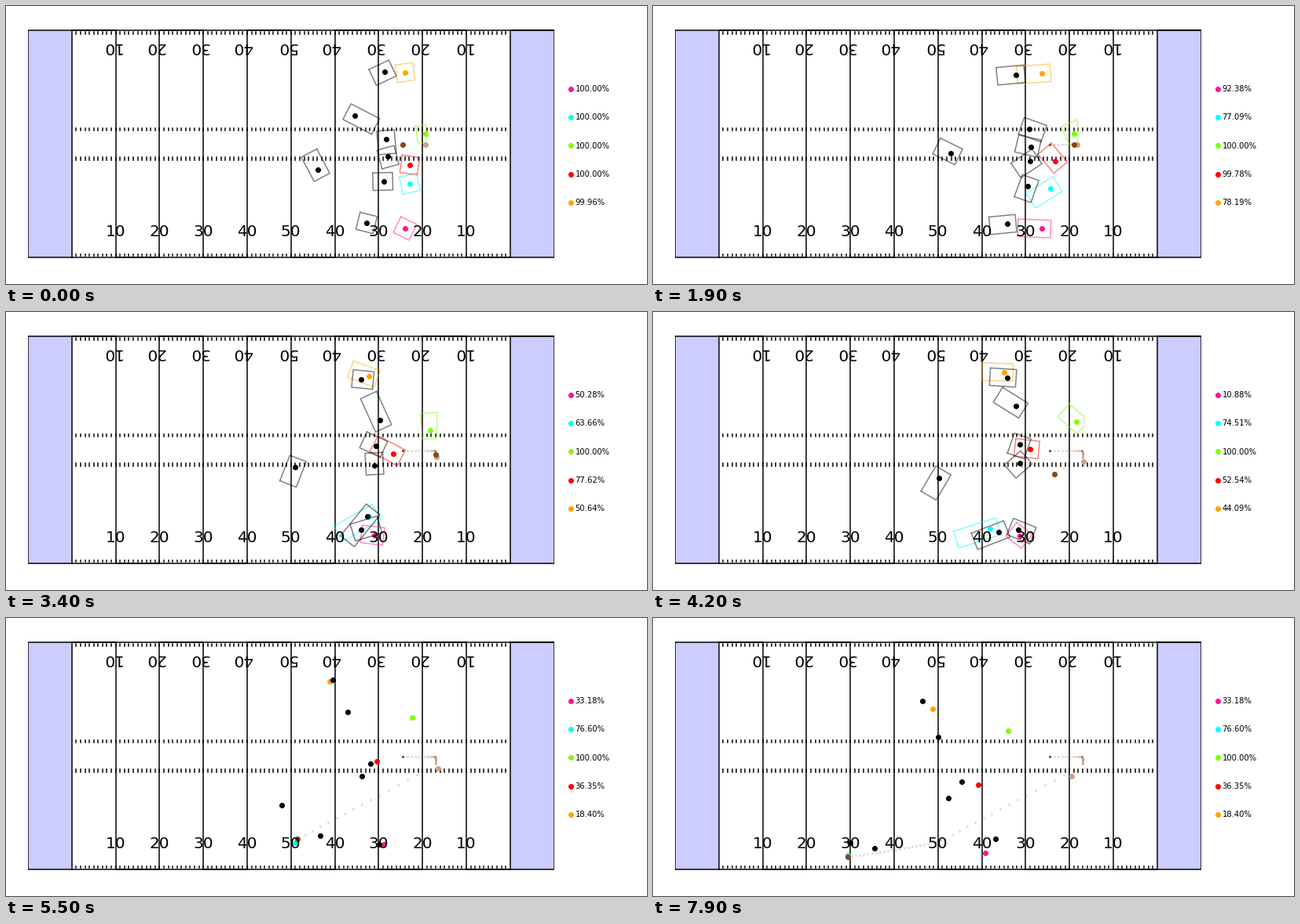
A matplotlib script for the animation above (8000 ms loop, 816 by 355 pixels).

```python
import numpy as np
import matplotlib.pyplot as plt
from matplotlib.animation import FuncAnimation
from matplotlib.patches import Rectangle

W, H, DPI = 816, 355, 72
FRAMES, STEP = 80, 100
HALF = 11.2                      # two yards in pixels
SNAP, CATCH, THROW, ARRIVAL = 12, 27, 39, 55
KEYS = np.array([0, 11, 27, 42, 55, 79])

plt.rcParams["font.family"] = "DejaVu Sans"
fig = plt.figure(figsize=(W / DPI, H / DPI), dpi=DPI, facecolor="white")
ax = fig.add_axes([0, 0, 1, 1])
ax.set_xlim(0, W)
ax.set_ylim(H, 0)
ax.axis("off")

# Positions are complex numbers: x + y*1j, in pixels.
# Each row: colour, facing at rest in degrees, waypoints at KEYS.
# Five waypoints mean the player stands still until the snap.
PLAYERS = [
    ("deeppink", 206, 508+284j, 477+285j, 467+286j, 481+289j, 423+300j),
    ("cyan", 167, 514+227j, 486+246j, 429+277j, 368+287j, 248+303j),
    ("chartreuse", 172, 534+163j, 538+159j, 539+140j, 517+127j, 452+144j),
    ("red", 188, 514+203j, 505+189j, 480+175j, 472+183j, 414+213j),
    ("orange", 172, 508+85j, 474+86j, 447+77j, 412+81j, 356+116j),
    ("black", 148, 482+84j, 474+87j, 451+87j, 451+84j, 416+79j, 343+106j),
    ("black", 31, 444+140j, 468+152j, 483+154j, 462+120j, 435+120j, 363+152j),
    ("black", 88, 484+170j, 485+181j, 475+175j, 467+169j, 464+186j, 393+209j),
    ("black", 82, 486+192j, 487+195j, 471+200j, 467+193j, 453+202j, 376+230j),
    ("black", 172, 481+224j, 477+224j, 473+241j, 440+281j, 400+278j, 282+294j),
    ("black", 194, 459+277j, 444+280j, 465+278j, 475+289j, 436+282j),
    ("black", 245, 397+209j, 388+193j, 371+189j, 364+212j, 351+239j, 251+287j),
]
PASSER = (534+177j, 534+176j, 547+180j, 548+191j, 550+192j, 533+202j)

ODDS_KEYS = KEYS[:5]
ODDS = [
    (100, 100, 84.76, 10.88, 33.18),
    (100, 100, 54.17, 74.51, 76.60),
    (100, 100, 100, 100, 100),
    (100, 100, 99.57, 52.54, 36.35),
    (99.96, 100, 56.37, 44.09, 18.40),
]


# ---- motion ----------------------------------------------------------
def run(points):
    """Smooth run through the waypoints, one position per frame."""
    if len(points) < len(KEYS):
        points = points[:1] + points
    p, h = np.array(points), np.diff(KEYS)
    d = np.diff(p) / h
    m = np.r_[d[0], (d[:-1] * h[1:] + d[1:] * h[:-1]) / (h[:-1] + h[1:]), d[-1]]
    m[1:-1][d[:-1] * d[1:] == 0] = 0
    k = np.arange(FRAMES)
    i = np.clip(np.searchsorted(KEYS, k, side="right") - 1, 0, len(h) - 1)
    s = (k - KEYS[i]) / h[i]
    return ((1 + 2 * s) * (1 - s) ** 2 * p[i] + s * (1 - s) ** 2 * h[i] * m[i]
            + s * s * (3 - 2 * s) * p[i + 1] + s * s * (s - 1) * h[i] * m[i + 1])


def ball_path(passer, catcher):
    """Snap, hold, throw, then carry."""
    k = np.arange(FRAMES)
    hands = passer - 1 - 3j
    start, release, landing = 505 + 177j, 548 + 187j, 371 + 282j
    u = np.clip((k - SNAP) / (CATCH - SNAP), 0, 1)
    snap = start + (hands[CATCH] - start) * (1 - (1 - u) ** 2.2)
    u = (k - THROW) / (ARRIVAL - THROW)
    throw = release + (landing - release) * u * (1 + 0.15 * (1 - u))
    reach = landing - catcher[ARRIVAL] - 2j
    carry = catcher + 2j + reach * np.exp(-np.maximum(k - ARRIVAL, 0) / 8)
    return np.select([k <= CATCH, k <= THROW, k <= ARRIVAL],
                     [snap, hands, throw], carry)


def box(pos, velocity, facing, limit):
    """Outline around a player, stretched ahead by speed, cut at x = limit."""
    ahead = velocity + 0.4 * np.exp(1j * np.radians(facing))
    ahead /= abs(ahead)
    front = pos + (HALF + 7.5 * abs(velocity)) * ahead
    back, side = pos - HALF * ahead, HALF * 1j * ahead
    corners = [front + side, front - side, back - side, back + side]
    out = []
    for p, q in zip(corners, corners[1:] + corners[:1]):
        if p.real <= limit:
            out.append(p)
        if (p.real <= limit) != (q.real <= limit):
            out.append(p + (limit - p.real) / (q.real - p.real) * (q - p))
    return np.array(out + out[:1])


# ---- drawing ---------------------------------------------------------
def fx(yards):
    return 28 + 5.58 * np.asarray(yards, float)


def fy(yards):
    return 321.2 - 5.44 * np.asarray(yards, float)


def draw_field():
    for x in (0, 110):
        ax.add_patch(Rectangle((fx(x), fy(53.3)), 55.8, fy(0) - fy(53.3),
                               fc="blue", alpha=0.2, lw=0, zorder=0))
    xs, ys = [], []
    for i, x in enumerate(range(10, 120, 10)):
        xs += [x, x]
        ys += [0, 53.3] if i % 2 == 0 else [53.3, 0]
    xs += [120, 0, 0, 120, 120]
    ys += [53.3, 53.3, 0, 0, 53.3]
    border, = ax.plot(fx(xs), fy(ys), color="black", lw=1.5, zorder=2)
    border.set_clip_path(Rectangle((fx(0), 0), fx(120) - fx(0), H,
                                   transform=ax.transData))

    for x in range(11, 110):
        for span in ((0.4, 0.7), (52.5, 53.0), (22.91, 23.57), (29.73, 30.39)):
            ax.plot(fx([x, x]), fy(span), color="black", lw=1.5, zorder=2)

    for x in range(20, 110, 10):
        label = str(min(x, 120 - x) - 10)
        ax.text(fx(x), fy(5), label, ha="center", fontsize=20)
        ax.text(fx(x - 0.95), fy(48.3), label, ha="center", fontsize=20,
                rotation=180)


def dot(color, z, **kw):
    style = dict(marker="o", ms=6, mew=1, ls="none", color=color, zorder=z)
    return ax.plot([], [], **{**style, **kw})[0]


def place(artist, points):
    points = np.atleast_1d(points)
    artist.set_data(points.real, points.imag)


draw_field()

players = []
for color, facing, *points in PLAYERS:
    outline, = ax.plot([], [], color=color, lw=1.5, alpha=0.5, zorder=2.3)
    marker = dot(color, 2.6 if color == "black" else 2.5)
    pos = run(points)
    players.append((marker, outline, pos, np.gradient(pos), facing))

passer = run(PASSER)
ball = ball_path(passer, players[1][2])
passer_dot = dot((0.80, 0.63, 0.54), 2.7)
ball_dot = dot("saddlebrown", 2.8)

# one artist per past position, so that overlaps build up
trail = [dot("saddlebrown", 2.35, ms=3, mew=0, alpha=0.2) for _ in ball]
for mark, point in zip(trail, ball):
    place(mark, point)

odds = []
for i, values in enumerate(ODDS):
    y = 105.95 + 36.22 * i
    place(dot(PLAYERS[i][0], 3), 719.2 + 1j * y)
    odds.append((ax.text(724.6, y + 3.2, "", fontsize=10), values))


def draw(k):
    for marker, outline, pos, velocity, facing in players:
        place(marker, pos[k])
        place(outline, box(pos[k], velocity[k], facing, passer[k].real + 0.5))
        outline.set_visible(k < ARRIVAL)
    for i, mark in enumerate(trail):
        mark.set_visible(i < k)
    place(passer_dot, passer[k])
    place(ball_dot, ball[k])
    for label, values in odds:
        label.set_text(f"{np.interp(k, ODDS_KEYS, values):.2f}%")
    return []


anim = FuncAnimation(fig, draw, frames=FRAMES, interval=STEP, repeat=True,
                     repeat_delay=0, init_func=lambda: draw(0))
plt.show()
```
